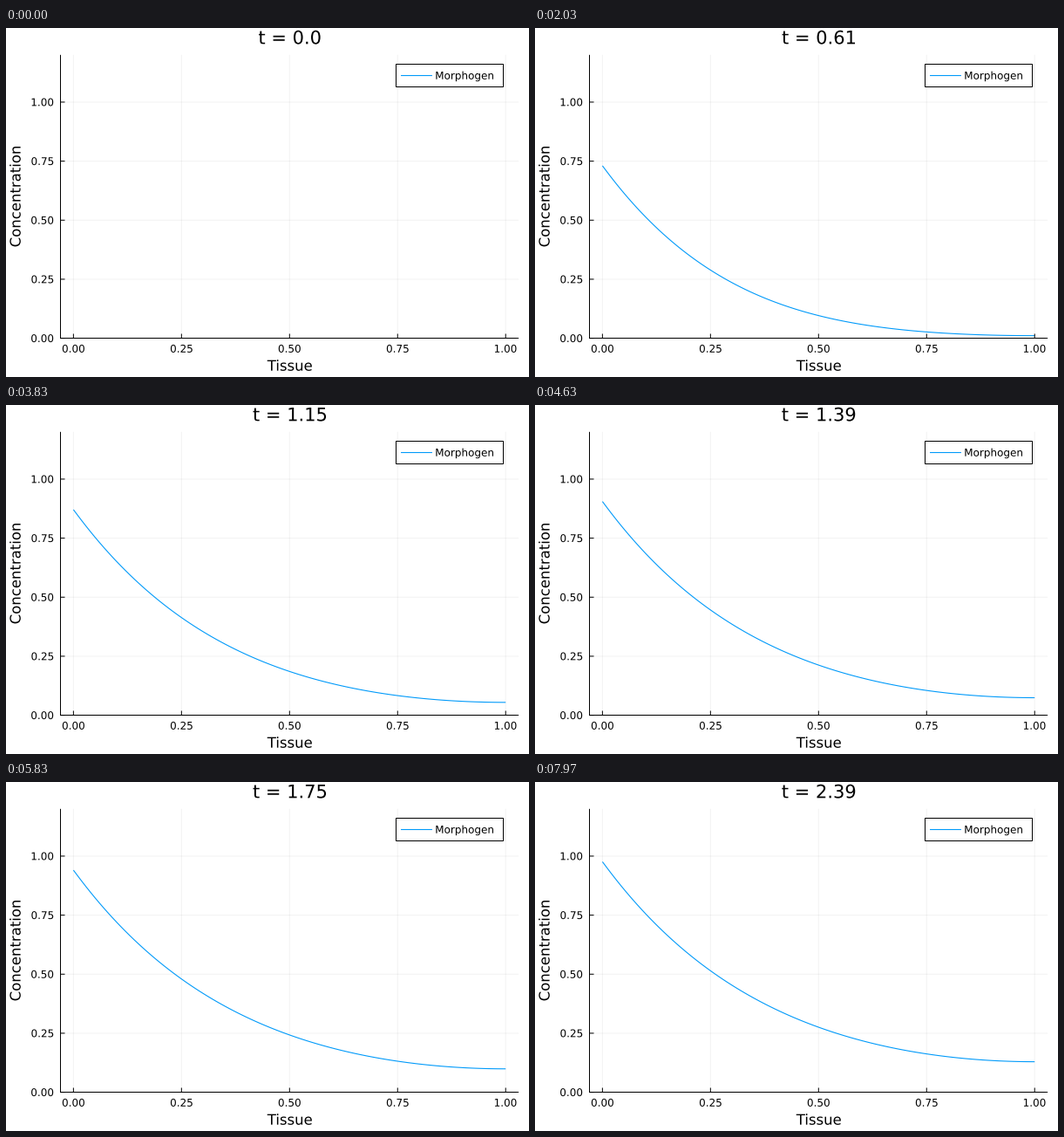
A matplotlib script for the animation above (8 s loop, 600 by 400 pixels).

```python
import matplotlib.pyplot as plt
import numpy as np
from matplotlib.animation import FuncAnimation
from matplotlib.patches import PathPatch, Rectangle
from matplotlib.textpath import TextPath
from matplotlib.transforms import Affine2D

W, H, DPI = 600, 400, 100
PX = 72 / DPI  # points per pixel
LOOP_MS, TICK_MS = 8000, 10
DT = 0.01
BLUE = "#009afa"
LEFT, RIGHT, TOP, BOTTOM = 62.5, 588.1, 30.8, 355.6
AXIS_Y = 355.5
FONT = {"family": "DejaVu Sans"}

# Diffusion with decay, constant inflow on the left, closed right end,
# solved as a cosine series.
DIFF, DECAY, FLUX = 0.16, 1.0, 0.4
MODES = np.arange(2000)
RATES = DECAY + DIFF * (MODES * np.pi) ** 2
WEIGHTS = np.where(MODES == 0, 1, 2) * FLUX / RATES
X = np.linspace(0, 1, 101)
BASIS = np.cos(np.pi * np.outer(X, MODES))


def profile(t):
    return BASIS @ (-WEIGHTS * np.expm1(-RATES * t))


def to_px(x):
    return LEFT + (x + 0.03) / 1.06 * (RIGHT - LEFT)


def to_py(y):
    return BOTTOM - y / 1.2 * (BOTTOM - TOP)


def text_path(x, y, text, size, align=0.5, angle=0):
    """Outline of text with its baseline at pixel (x, y)."""
    path = TextPath((0, 0), text, size=size, prop=FONT)
    box = path.get_extents()
    shift = -(box.x0 + align * box.width)
    place = Affine2D().translate(shift, 0).scale(1, -1)
    return place.rotate_deg(angle).translate(x, y).transform_path(path)


def label(*args, **kw):
    patch = PathPatch(text_path(*args, **kw), facecolor="black", linewidth=0)
    return ax.add_patch(patch)


plt.rcParams["path.snap"] = False
fig = plt.figure(figsize=(W / DPI, H / DPI), dpi=DPI, facecolor="white")
ax = fig.add_axes([0, 0, 1, 1])
ax.axis("off")

ticks = np.linspace(0, 1, 5)
xs, ys = to_px(ticks), to_py(ticks)
grid = dict(color="black", alpha=0.05, linewidth=PX, zorder=1)
ax.vlines(xs, TOP, BOTTOM, **grid)
ax.hlines(ys, LEFT, RIGHT, **grid)

frame = dict(color="black", linewidth=PX, zorder=3)
ax.vlines(LEFT, TOP, AXIS_Y + 0.5, **frame)
ax.hlines(AXIS_Y, LEFT - 0.5, RIGHT, **frame)
ax.vlines(xs, AXIS_Y - 5, AXIS_Y, **frame)
ax.hlines(ys, LEFT, LEFT + 5, **frame)

for v, px, py in zip(ticks, xs, ys):
    label(px, 371.8, f"{v:.2f}", 12)
    label(54.2, py + 4.4, f"{v:.2f}", 12, align=1)

mid_x, mid_y = (LEFT + RIGHT) / 2, (TOP + BOTTOM) / 2
label(mid_x, 392.7, "Tissue", 16.5)
label(16.6, mid_y, "Concentration", 16.5, angle=-90)
title = label(mid_x, 18.3, "t", 21)

ax.add_patch(Rectangle((447.5, 41.5), 123, 26, facecolor="white",
                       edgecolor="black", linewidth=PX))
ax.hlines(54.5, 453, 489, color=BLUE, linewidth=1.1 * PX)
label(493.4, 58.7, "Morphogen", 12, align=0)

curve, = ax.plot(to_px(X), to_py(profile(0)), color=BLUE,
                 linewidth=1.1 * PX, solid_capstyle="butt")
ax.set(xlim=(0, W), ylim=(H, 0))
curve.set_clip_path(Rectangle((LEFT, TOP), RIGHT - LEFT, BOTTOM - TOP,
                              transform=ax.transData))


def update(tick):
    # 30 steps a second, held for 30 or 40 ms each
    t = round((3 * tick + 1) // 10 * DT, 2)
    curve.set_ydata(to_py(profile(t)))
    title.set_path(text_path(mid_x, 18.3, f"t = {t}", 21))
    return curve, title


anim = FuncAnimation(fig, update, frames=LOOP_MS // TICK_MS, interval=TICK_MS,
                     repeat=True, repeat_delay=0, blit=False)
plt.show()
```
